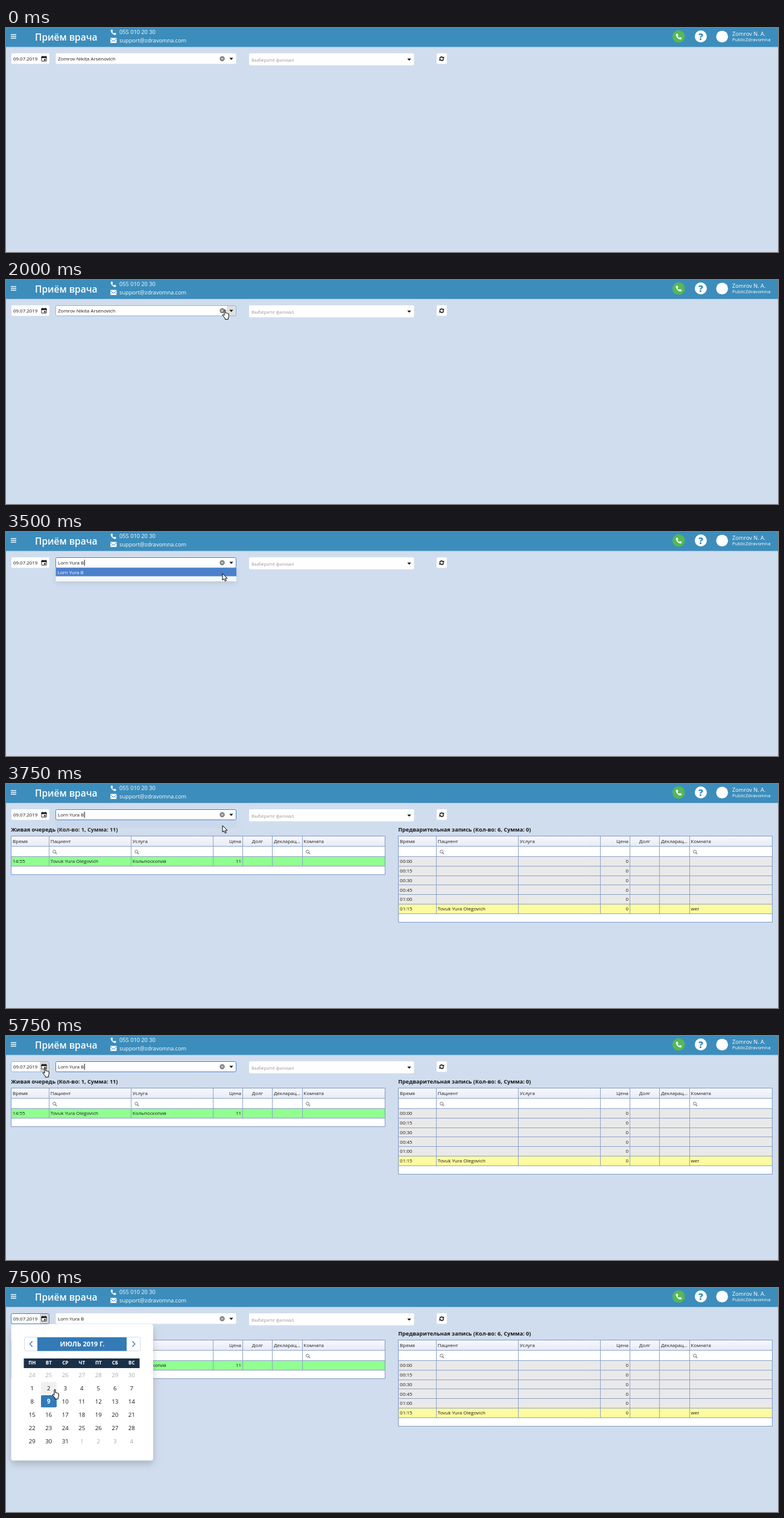
An HTML page with a canvas for the animation above (8 s loop, 1280 px wide and 372 px high).

```html
<!DOCTYPE html>
<html lang="ru">
<head>
<meta charset="utf-8">
<title>Приём врача</title>
<style>
html, body { margin: 0; width: 100%; height: 100%; overflow: hidden; background: #d0ddee; }
canvas { display: block; width: 1280px; height: 372px; }
</style>
</head>
<body>
<canvas id="stage"></canvas>
<script>
const W = 1280, H = 372, LOOP = 8000, STEP = 250;
const FONT = '"Open Sans", "Noto Sans", sans-serif';
const BLUE = '#337ab7', LINE = '#8ea3c8', FOCUS = '#4a80c0', HOVER = '#93b4dc', INK = '#1a1a1a';
const DOCTOR = 'Zomrov Nikita Arsenovich', PICKED = 'Lorn Yura B', PATIENT = 'Tovuk Yura Olegovich';

const canvas = document.getElementById('stage');
const dpr = window.devicePixelRatio || 1;
canvas.width = W * dpr;
canvas.height = H * dpr;
const c = canvas.getContext('2d');

const PHONE = new Path2D('M1 1.2L3 .3 4.3 3.2 3 4.3Q4 6.2 5.8 7L7 5.8 9.8 7.2 9 9.2Q8 9.8 6.6 9.4C3.5 8.4 1.3 5.5 .6 3Q.5 1.8 1 1.2Z');
const ARROW = new Path2D('M0 0V11L2.6 8.7 4.3 12.6 6.2 11.8 4.5 8H8Z');
const HAND = new Path2D('M-1 1.2Q0 -.3 1 1.2V6Q2.3 5.2 2.8 6.3 4.1 5.6 4.6 6.8 6.2 6.3 6.3 8V11Q6.3 13 5.3 14V16.3H.3V14.7L-3.6 10Q-4.2 8.2 -2.7 8.4L-1 9.8Z');

// Pointer stops: time, x, y, shape
const POINTER = [
  [1250, 500, 310, ARROW], [1500, 452, 205, ARROW], [1750, 396, 96, ARROW],
  [2000, 363, 49, HAND], [2250, 360, 50, HAND], [2750, 363, 53, HAND],
  [3000, 361, 62, ARROW], [3250, 359, 69, ARROW], [5000, 348, 64, ARROW],
  [5250, 250, 40, ARROW], [5500, 130, 43, ARROW], [5750, 65, 52, HAND],
  [6500, 72, 72, ARROW], [6750, 84, 108, ARROW], [7000, 88, 140, HAND],
  [7250, 81, 168, HAND]
];

function rect(x, y, w, h, fill, r = 0, stroke) {
  c.beginPath();
  c.roundRect(x, y, w, h, r);
  if (fill) { c.fillStyle = fill; c.fill(); }
  if (stroke) { c.strokeStyle = stroke; c.lineWidth = 1; c.stroke(); }
}

function disc(x, y, r, fill) {
  c.beginPath();
  c.arc(x, y, r, 0, 7);
  c.fillStyle = fill;
  c.fill();
}

function poly(points, color, width) {
  c.beginPath();
  points.forEach(([x, y]) => c.lineTo(x, y));
  if (width) {
    c.strokeStyle = color;
    c.lineWidth = width;
    c.stroke();
  } else {
    c.fillStyle = color;
    c.fill();
  }
}

// cy is the middle of the capital letters
function text(s, x, cy, size = 8, color = INK, weight = 400, align = 'left') {
  c.font = `${weight} ${size}px ${FONT}`;
  c.textAlign = align;
  c.fillStyle = color;
  c.fillText(s, x, cy + size * 0.36);
  return c.measureText(s).width;
}

function shape(path, x, y, fill, scale = 1, outline) {
  c.save();
  c.translate(x, y);
  c.scale(scale, scale);
  c.fillStyle = fill;
  c.fill(path);
  if (outline) { c.strokeStyle = outline; c.lineWidth = 1; c.lineJoin = 'round'; c.stroke(path); }
  c.restore();
}

function shadow(blur, alpha, y, draw) {
  c.save();
  c.shadowColor = `rgba(0,0,0,${alpha})`;
  c.shadowBlur = blur * dpr;
  c.shadowOffsetY = y * dpr;
  draw();
  c.restore();
}

function caret(x, y) { rect(x, y, 1, 10, '#111'); }
function drop(x, y) { poly([[x - 3.2, y - 1.6], [x + 3.2, y - 1.6], [x, y + 1.9]], '#111'); }

function header() {
  rect(0, 0, W, 31.5, '#3c8dbc');
  for (const y of [11, 14, 17]) rect(8, y - 0.7, 9, 1.4, '#fff');
  text('Приём врача', 48, 15.5, 15.5, '#fff', 600);
  shape(PHONE, 173, 2, '#fff');
  text('055 010 20 30', 188, 7.1, 9.2, '#fff');
  rect(173, 16.5, 10.5, 8.5, '#fff');
  poly([[173, 17.5], [178.2, 22], [183.5, 17.5]], '#3c8dbc', 1);
  poly([[173, 24.5], [176.5, 20.8]], '#3c8dbc', 0.7);
  poly([[183.5, 24.5], [180, 20.8]], '#3c8dbc', 0.7);
  text('support@zdravomna.com', 188, 20.9, 9.2, '#fff');
  disc(1115.3, 14, 10.3, '#55b954');
  shape(PHONE, 1110, 8.8, '#fff', 1.08);
  disc(1152, 14, 10, '#fff');
  text('?', 1152, 14, 16, '#3c8dbc', 800, 'center');
  disc(1187.3, 14.3, 9.8, '#fff');
  text('Zomrov N. A.', 1204, 9.5, 9.2, '#fff');
  text('PublicZdravomna', 1204, 19.5, 7.8, '#fff');
}

function dateField(t) {
  const focused = t >= 6000, hovered = t >= 5750;
  rect(9, 42, 63, 17.5, '#fff', 2);
  if (hovered) rect(56, 43, 15.5, 16, '#d9d9d9');
  if (hovered) rect(8.5, 42.5, 63, 17, null, 2, focused ? FOCUS : HOVER);
  const w = text('09.07.2019', 12, 51, 7.9);
  if (focused && Math.floor(t / 500) % 2 === 0) caret(12.5 + w, 46);
  rect(59, 47.5, 8, 7.5, '#fff', 0.5, '#222');
  rect(58.6, 47, 8.8, 3, '#222');
  rect(60.5, 46, 1.2, 2, '#222');
  rect(64.3, 46, 1.2, 2, '#222');
  rect(63, 51.5, 2.5, 2.3, '#222');
}

function doctorField(t) {
  const focused = t >= 2500 && t < 6000, hovered = t >= 2000 && t < 2500;
  rect(82.5, 42, 299, 17.5, '#fff', 2);
  if (hovered) rect(366, 43, 15.5, 16, '#e0e0e0');
  if (focused || hovered) rect(82.5, 42.5, 299, 17, null, 2, focused ? FOCUS : HOVER);
  const name = t < 2500 ? DOCTOR : t < 3500 ? '' : PICKED;
  const w = text(name, 86, 51);
  if (focused && Math.floor(t / 500) % 2) caret(86.5 + w, 46);
  if (name) {
    disc(358.5, 51, 4.2, '#808080');
    poly([[356.8, 49.3], [360.2, 52.7]], '#fff', 1);
    poly([[360.2, 49.3], [356.8, 52.7]], '#fff', 1);
  }
  drop(373.5, 51);
}

function refreshButton() {
  rect(714, 42, 17, 17.5, '#fff', 2);
  c.strokeStyle = '#111';
  c.lineWidth = 1.5;
  for (const turn of [0, Math.PI]) {
    c.save();
    c.translate(722.3, 51);
    c.rotate(turn);
    c.beginPath();
    c.arc(0, 0, 3, Math.PI * 1.02, Math.PI * 1.8);
    c.stroke();
    poly([[4, -3.8], [4, -0.5], [0.8, -0.6]], '#111');
    c.restore();
  }
}

function doctorList(t) {
  if (t < 3000 || t >= 4000) return;
  const lit = t >= 3250;
  c.save();
  c.globalAlpha = t >= 3750 ? 0.06 : 1;
  shadow(8, 0.1, 3, () => rect(82.5, 59.5, 299.5, 22.5, '#f5f7fb'));
  if (lit) rect(82.5, 59.5, 299.5, 14, '#4b80cb');
  text(PICKED, 85.5, 67, 8, lit ? '#fff' : INK);
  c.restore();
}

const COLS = [0, 62.7, 198.7, 334.7, 384, 433, 482.5, 620];
const TITLES = ['Время', 'Пациент', 'Услуга', 'Цена', 'Долг', 'Декларац...', 'Комната'];

function cell(s, x0, i, y) {
  if (i === 3) text(s, x0 + COLS[4] - 2.5, y, 8, INK, 400, 'right');
  else if (i === 4) text(s, x0 + (COLS[4] + COLS[5]) / 2, y, 8, INK, 400, 'center');
  else text(s, x0 + COLS[i] + 2.6, y);
}

function lens(x, y) {
  c.beginPath();
  c.arc(x - 0.7, y - 0.7, 2.5, 0, 7);
  c.strokeStyle = '#777';
  c.lineWidth = 1;
  c.stroke();
  poly([[x + 1.2, y + 1.2], [x + 3.4, y + 3.4]], '#777', 1.3);
}

function table(x0, caption, filters, rows, bottom) {
  const top = 86.5, first = 120.5, rowH = 15.8, last = first + rows.length * rowH;
  text(caption, x0 - 0.3, 75.7, 9.15, INK, 700);
  rect(x0, top, 620, bottom - top, '#fff');
  const fade = c.createLinearGradient(0, top, 0, 103);
  fade.addColorStop(0, '#f8f9fd');
  fade.addColorStop(1, '#e7ebf5');
  rect(x0, top, 620, 16.5, fade);
  rows.forEach((row, r) => rect(x0, first + r * rowH, 620, rowH, row.fill));
  for (const x of COLS.slice(1, -1)) {
    const px = Math.floor(x0 + x) + 0.5;
    poly([[px, top], [px, last]], LINE, 1);
  }
  const edges = [103, first, ...rows.map((_, r) => first + (r + 1) * rowH)];
  for (const y of edges) {
    const py = Math.floor(y) + 0.5;
    poly([[x0, py], [x0 + 620, py]], LINE, 1);
  }
  rect(x0, top, 620, bottom - top, null, 0, '#7f98c6');
  TITLES.forEach((s, i) => cell(s, x0, i, 95.5));
  for (const i of filters) lens(x0 + COLS[i] + 9.7, 113);
  rows.forEach((row, r) => row.cells.forEach((s, i) => cell(s, x0, i, first + (r + 0.5) * rowH)));
}

const LIVE = [{ fill: '#90ff90', cells: ['14:55', PATIENT, 'Кольпоскопия', '11'] }];
const BOOKED = ['00:00', '00:15', '00:30', '00:45', '01:00'].map(s => ({ fill: '#e9e9e9', cells: [s, '', '', '0'] }));
BOOKED.push({ fill: '#fdfba0', cells: ['01:15', PATIENT, '', '0', '', '', 'wer'] });

function calendar(pointer) {
  shadow(12, 0.18, 6, () => rect(8.5, 60, 235.5, 226.5, '#fff', 4));
  rect(30.5, 81.5, 192, 23, '#fff', 2, '#d5dbe2');
  rect(52, 82, 148, 22.5, BLUE);
  poly([[43.8, 88.5], [39.5, 93], [43.8, 97.5]], BLUE, 1.3);
  poly([[209.5, 88.5], [213.8, 93], [209.5, 97.5]], BLUE, 1.3);
  text('ИЮЛЬ 2019 Г.', 126.5, 93.2, 10.8, '#fff', 700, 'center');
  rect(29.5, 117, 192, 16, '#1a3048');
  ['ПН', 'ВТ', 'СР', 'ЧТ', 'ПТ', 'СБ', 'ВС'].forEach((s, i) =>
    text(s, 43.3 + i * 27.5, 124.5, 8, '#fff', 700, 'center'));
  for (let i = 0; i < 42; i++) {
    const x = 43.3 + (i % 7) * 27.5, y = 144.3 + Math.floor(i / 7) * 22;
    const day = i - 6, inside = day > 0 && day < 32, chosen = day === 9;
    const over = pointer[3] === HAND && Math.abs(pointer[1] - x) < 13 && Math.abs(pointer[2] - y) < 10.5;
    if (chosen) rect(x - 12.8, y - 10.3, 26, 20.3, BLUE, 2);
    else if (over && inside) rect(x - 12.8, y - 10.3, 26, 20.3, '#f0f0f0', 2);
    const label = day < 1 ? day + 30 : day > 31 ? day - 31 : day;
    text(label, x, y, 9.7, chosen ? '#fff' : inside ? INK : '#aaa', chosen ? 700 : 400, 'center');
  }
}

function draw(t) {
  const pointer = POINTER.filter(p => p[0] <= t).pop();
  c.setTransform(dpr, 0, 0, dpr, 0, 0);
  rect(0, 0, W, H, '#d0ddee');
  header();
  dateField(t);
  doctorField(t);
  rect(403, 42, 273.5, 20, '#fff', 2);
  text('Выберите филиал', 407, 53, 8, '#999');
  drop(668.5, 52.3);
  refreshButton();
  if (t >= 3750) {
    table(8.5, 'Живая очередь (Кол-во: 1, Сумма: 11)', [1, 2, 6], LIVE, 150.5);
    table(650.5, 'Предварительная запись (Кол-во: 6, Сумма: 0)', [1, 6], BOOKED, 229.5);
  }
  doctorList(t);
  if (t >= 6000) calendar(pointer);
  if (pointer) shape(pointer[3], pointer[1], pointer[2], '#fff', 1, '#000');
}

function tick() {
  const t = performance.now() % LOOP;
  draw(Math.floor(t / STEP) * STEP);
  requestAnimationFrame(tick);
}
tick();
</script>
</body>
</html>
```
